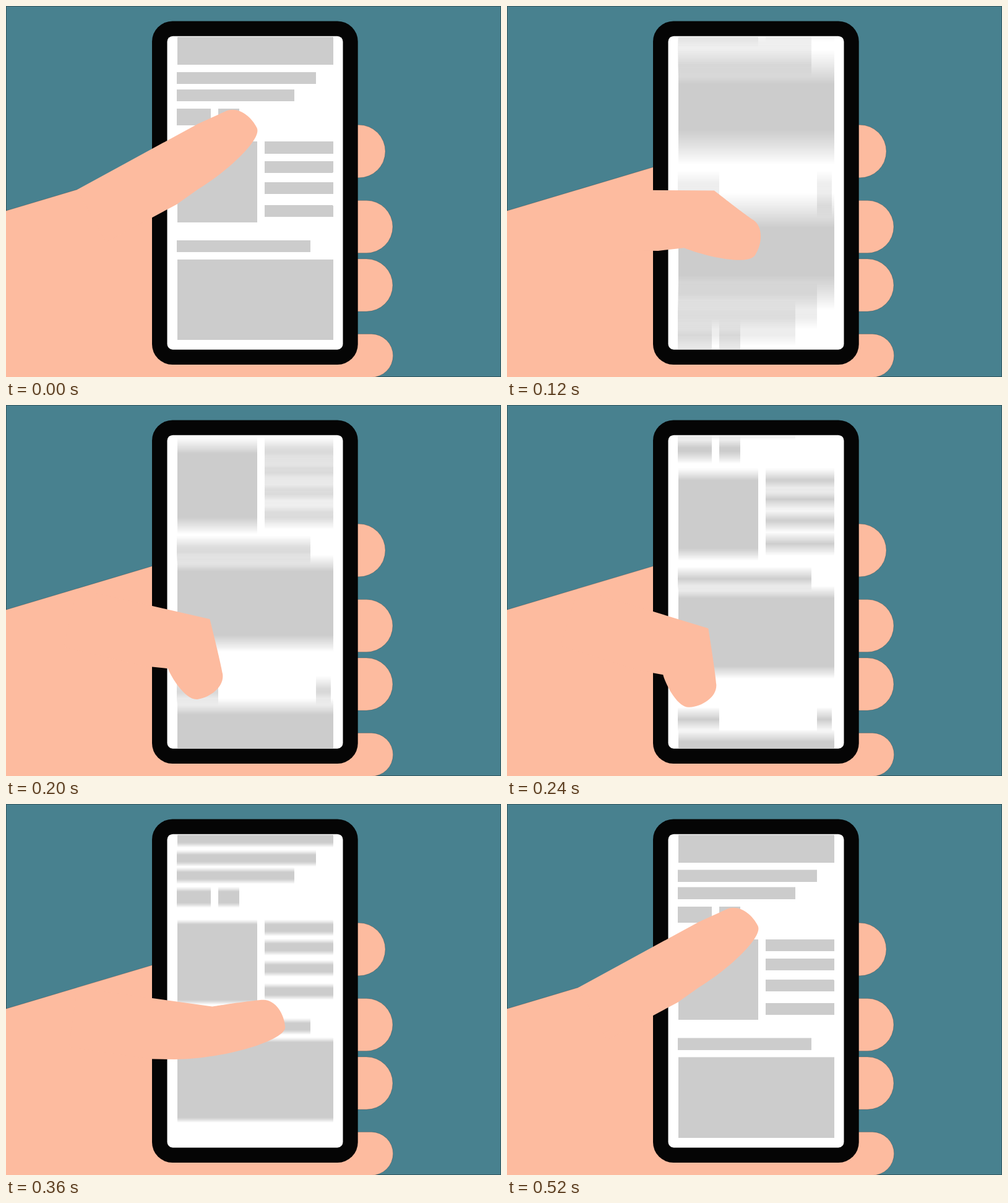
An HTML page with a canvas for the animation above (0.64 s loop, 800 px wide and 600 px high).

```html
<!DOCTYPE html>
<html lang="en">
<head>
<meta charset="utf-8">
<title>Thumb scrolling a phone</title>
<style>
  html, body { margin: 0; width: 800px; height: 600px; overflow: hidden; background: #48818f; }
  svg, canvas { position: absolute; display: block; }
  svg { left: 0; top: 0; }
  canvas { left: 260px; top: 50px; }
  .skin { fill: #fdbb9f; }
  .edge { stroke: #000; stroke-opacity: .35; stroke-width: .5; }
</style>
</head>
<body>
<svg width="800" height="600">
  <rect class="edge" x=".5" y=".5" width="799" height="599" fill="#48818f" style="stroke-width:1"/>
  <g class="skin edge">
    <path d="M-1 331.500L250 256.500V400H400V530.500H590.500a35 35 0 0 1 0 70H-1z"/>
    <rect x="500" y="192.300" width="113" height="85.500" rx="42.750"/>
    <rect x="500" y="314.500" width="125" height="85" rx="42.500"/>
    <rect x="500" y="409" width="125" height="85" rx="42.500"/>
  </g>
  <rect x="236" y="24.500" width="332.700" height="555.500" rx="33" fill="#050505"/>
  <rect x="260.500" y="48.700" width="284" height="507" rx="9" fill="#fff"/>
</svg>
<canvas id="page" width="284" height="505"></canvas>
<svg width="800" height="600"><path id="thumb" class="skin"/></svg>

<script>
const LOOP = 640, STEP = 40, SCROLL = 520;
const mix = (a, b, u) => a + (b - a) * u;

// Page of grey blocks, repeating every PAGE pixels
const PAGE = 680, SHUTTER = 20, SAMPLES = 51;
const ctx = document.getElementById('page').getContext('2d');

function drawBlocks() {
  const block = (y, w, h = 19, x = 276) => ctx.fillRect(x, y, w, h);
  const picture = (y, w, h) => block(y, w, h, 277);
  picture(-38, 251.5, 133);
  block(107, 225);
  block(135, 189.5);
  block(166.5, 55, 26);
  block(166.5, 34, 26, 343);
  picture(219.5, 128.5, 130);
  for (let i = 0; i < 4; i++) block(219.5 + i * (29.5 + 1.6 * i), 110.5, 19, 418);
  block(379, 216);
  picture(410, 251.5, 130);
  block(606, 67, 20);
  block(606, 23.5, 20, 501);
}

// cubic-bezier(.2, 0, .03, 1), solved by bisection
function ease(x) {
  if (x <= 0) return 0;
  if (x >= 1) return 1;
  let lo = 0, hi = 1, s;
  for (let i = 0; i < 30; i++) {
    s = (lo + hi) / 2;
    const r = 1 - s;
    if (3 * r * r * s * .2 + 3 * r * s * s * .03 + s ** 3 < x) lo = s; else hi = s;
  }
  return s * s * (3 - 2 * s);
}

const scrollAt = t => mix(-PAGE, -.5, ease(t / SCROLL));

// Motion blur: average the positions passed while the shutter is open
function drawPage(t) {
  ctx.setTransform(1, 0, 0, 1, 0, 0);
  ctx.clearRect(0, 0, 284, 505);
  ctx.globalCompositeOperation = 'lighter';
  ctx.fillStyle = `rgba(204,204,204,${1 / SAMPLES})`;
  for (let i = 0; i < SAMPLES; i++) {
    const shift = t ? scrollAt(t + ((i + .5) / SAMPLES - .5) * SHUTTER) : 0;
    for (const lap of [0, PAGE]) {
      ctx.setTransform(1, 0, 0, 1, -260, shift + lap - 50);
      drawBlocks();
    }
  }
}

// Thumb: a base turning on the palm, and a tip that bends and stretches
const up = { angle: -28.6, bend: 3.5, reach: 108 };
const keys = [
  { time: 0, ...up },
  { time: 80, angle: -8.1, bend: -.6, reach: 125 },
  { time: 160, angle: 8.9, bend: 66, reach: 93 },
  { time: 240, angle: 17, bend: 69, reach: 92 },
  { time: 360, angle: 8, bend: -11, reach: 149.5 },
  { time: 440, ...up },
  { time: LOOP, ...up }
];
const thumb = document.getElementById('thumb');

// Maps points of a frame with the given origin and turn to the stage
function frameAt([ox, oy], deg) {
  const a = deg * Math.PI / 180, c = Math.cos(a), s = Math.sin(a);
  return (x, y) => [ox + x * c - y * s, oy + x * s + y * c];
}

function drawThumb(t) {
  const n = keys.findIndex(k => k.time > t);
  const p = keys[n - 1], q = keys[n];
  const u = (t - p.time) / (q.time - p.time);
  const [angle, bend, reach] = ['angle', 'bend', 'reach'].map(k => mix(p[k], q[k], u));

  const base = frameAt([115, 297], angle);
  const tip = frameAt(base(195, 45), angle + bend);
  const knuckle = base(220, 0), crease = base(172, 93);
  const pad = tip(reach - 34, reach * .22 + 15);
  const belly = crease.map((v, i) => mix(v, pad[i], .6));
  thumb.setAttribute('d', `M${base(0, 0)}L${knuckle}
    C${knuckle} ${tip(reach - 54, -46)} ${tip(reach - 34, -46)}
    C${tip(reach - 14, -46)} ${tip(reach, -22)} ${tip(reach, 0)}
    C${tip(reach, 20)} ${belly} ${crease}
    L${base(130, 98)}L${base(0, 97)}Z`);
}

let shown = -1;
const start = performance.now();
function tick() {
  const now = Math.max(0, performance.now() - start) % LOOP;
  const t = Math.min(SCROLL, Math.floor(now / STEP) * STEP);
  if (t !== shown) {
    shown = t;
    drawPage(t);
    drawThumb(t);
  }
  requestAnimationFrame(tick);
}
tick();
</script>
</body>
</html>
```
